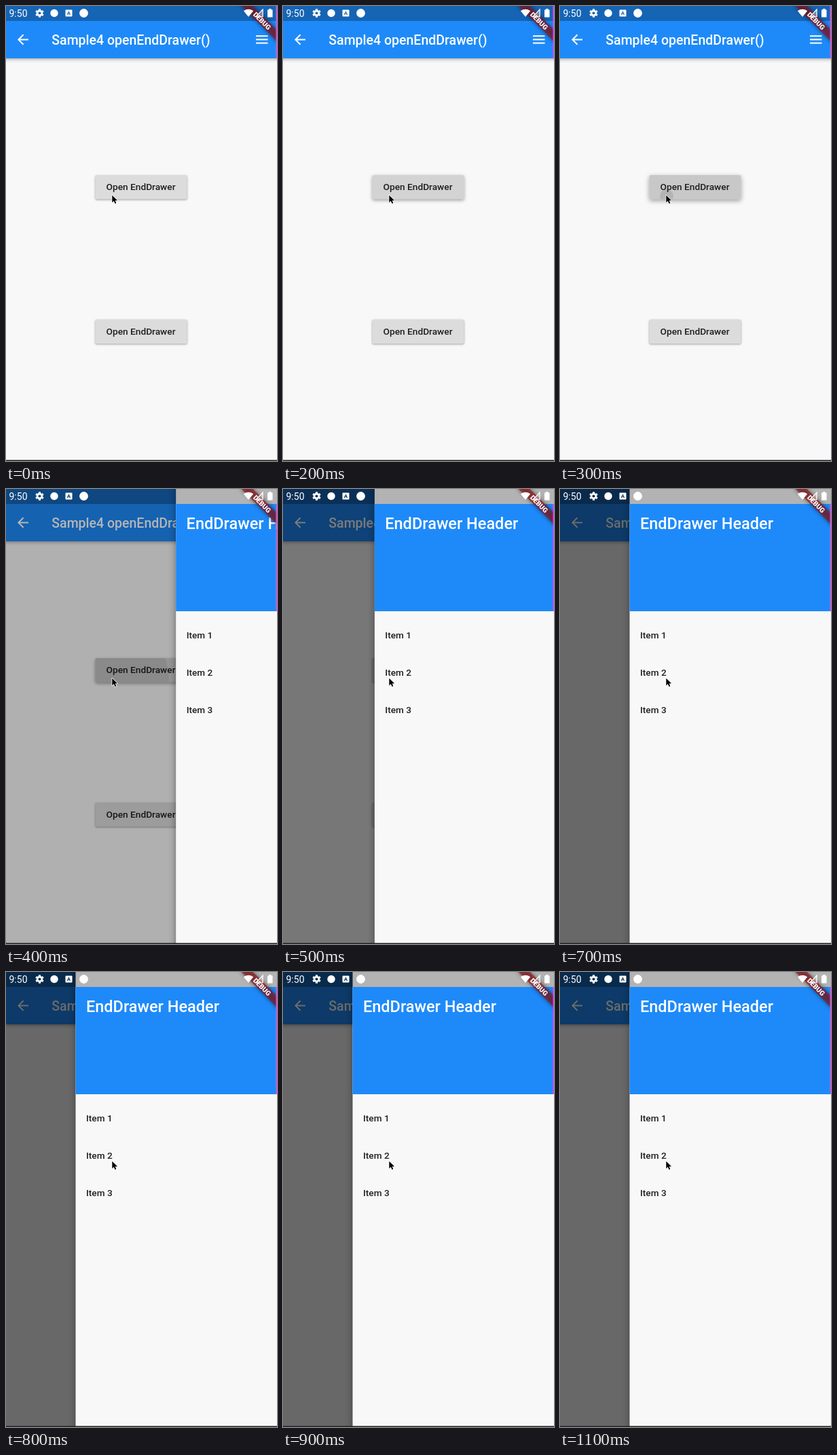
Write an HTML page with a canvas that moves like this. It is 399x670 px and loops after 1200 ms.

```html
<!DOCTYPE html>
<html lang="en">
<head>
<meta charset="utf-8">
<title>End drawer</title>
<style>
html, body { margin: 0; width: 100%; height: 100%; overflow: hidden; background: #f8f8f8; }
canvas { display: block; width: 399px; height: 670px; }
</style>
</head>
<body>
<canvas id="stage" width="399" height="670"></canvas>
<script>
const ctx = document.getElementById('stage').getContext('2d');
const W = 399, H = 670, LOOP = 1200, STEP = 100;
const BLUE = '#1e8af9', PAPER = '#f8f8f8', INK = '#1f1f1f';
const DRAWER = 296.5, BAR = 22;
const TOUCH = { x: 157, y: 280 };

const clamp = v => Math.max(0, Math.min(1, v));

function rect(x, y, w, h, color) {
  ctx.fillStyle = color;
  ctx.fillRect(x, y, w, h);
}

function circle(x, y, r, color) {
  ctx.fillStyle = color;
  ctx.beginPath();
  ctx.arc(x, y, r, 0, Math.PI * 2);
  ctx.fill();
}

function shape(points, color) {
  ctx.fillStyle = color;
  ctx.beginPath();
  points.forEach(([x, y]) => ctx.lineTo(x, y));
  ctx.closePath();
  ctx.fill();
}

function label(str, x, y, size, color, weight = 500, align = 'left') {
  ctx.font = `${weight} ${size}px Roboto, sans-serif`;
  ctx.textAlign = align;
  ctx.fillStyle = color;
  ctx.fillText(str, x, y);
}

function withShadow(alpha, blur, dy, draw) {
  ctx.save();
  ctx.shadowColor = `rgba(0,0,0,${alpha})`;
  ctx.shadowBlur = blur;
  ctx.shadowOffsetY = dy;
  draw();
  ctx.restore();
}

// Critically damped spring
function drawerOpen(t) {
  const u = Math.max(0, t - 319.6) * 0.02095;
  const p = 1 - (1 + u) * Math.exp(-u);
  return p > 0.99 ? 1 : p;
}

function button(y, press = 0, ripple = 0, splash = 0) {
  const x = 131.5, w = 135, h = 35.5;
  ctx.save();
  ctx.beginPath();
  ctx.roundRect(x, y, w, h, 2);
  ctx.fillStyle = '#dcdcdc';
  withShadow(0.36, 3 + 4 * press, 1 + 1.5 * press, () => ctx.fill());
  ctx.clip();
  rect(x, y, w, h, `rgba(0,0,0,${0.09 * press})`);
  if (ripple) circle(TOUCH.x, TOUCH.y, ripple, `rgba(0,0,0,${splash})`);
  ctx.restore();
  label('Open EndDrawer', 198.5, y + 22.3, 13.7, INK, 500, 'center');
}

function page(t) {
  rect(0, 0, W, H, PAPER);
  withShadow(0.35, 5, 1.5, () => rect(-8, 0, W + 16, 77, BLUE));

  ctx.strokeStyle = '#fff';
  ctx.lineWidth = 2;
  ctx.beginPath();
  ctx.moveTo(33, 49.5);
  ctx.lineTo(18.5, 49.5);
  ctx.moveTo(25.6, 42.3);
  ctx.lineTo(18.4, 49.5);
  ctx.lineTo(25.6, 56.7);
  ctx.stroke();
  for (let i = 0; i < 3; i++) rect(368, 43.2 + i * 5.2, 17.5, 2, '#fff');
  label('Sample4 openEndDrawer()', 67.3, 57, 19.5, '#fff');

  const press = t < 350 ? clamp((t - 100) / 200) : clamp(1 - (t - 350) / 120);
  const ripple = t < 250 ? 0 : t < 350 ? 10 : 83 + (t - 400) * 0.5;
  const splash = t < 350 ? 0.1 : 0.07 * clamp(1 - (t - 400) / 200);
  button(249, press, ripple, splash);
  button(461.8);
}

function drawer(p) {
  if (p <= 0) return;
  rect(0, 0, W, H, `rgba(0,0,0,${0.58 * p})`);
  const x = W - DRAWER * p;
  withShadow(0.4, 10, 0, () => rect(x, -20, DRAWER, H + 40, PAPER));
  rect(x, BAR, DRAWER, 158, BLUE);
  label('EndDrawer Header', x + 15.4, 59.4, 23.5, '#fff');
  for (let i = 0; i < 3; i++) {
    label('Item ' + (i + 1), x + 15.5, 220.4 + i * 55, 13.6, INK);
  }
}

function banner() {
  ctx.save();
  ctx.translate(W, 0);
  ctx.rotate(Math.PI / 4);
  ctx.filter = 'blur(3px)';
  rect(-39, 25, 78, 12, 'rgba(0,0,0,0.5)');
  ctx.filter = 'none';
  rect(-39, 25, 78, 12, 'rgba(150,20,28,0.63)');
  label('DEBUG', 0, 34.6, 10, '#fff', 900, 'center');
  ctx.restore();
}

function gear(x, y) {
  ctx.save();
  ctx.translate(x, y);
  for (let i = 0; i < 6; i++) {
    rect(-1.6, -6.2, 3.2, 4, '#fff');
    ctx.rotate(Math.PI / 3);
  }
  ctx.strokeStyle = '#fff';
  ctx.lineWidth = 2.6;
  ctx.beginPath();
  ctx.arc(0, 0, 3.4, 0, Math.PI * 2);
  ctx.stroke();
  ctx.restore();
}

function statusBar(back) {
  label('9:50', 4.5, 15.6, 14, '#fff', 400);
  gear(49.5, 10.5);
  circle(71, 10.5, 5.7, '#fff');
  ctx.beginPath();
  ctx.roundRect(87.5, 5.5, 10, 10, 1);
  ctx.fillStyle = '#fff';
  ctx.fill();
  label('A', 92.5, 13.4, 8, back, 700, 'center');
  circle(114.5, 10.5, 6.4, '#fff');

  // Wi-Fi
  ctx.fillStyle = '#fff';
  ctx.beginPath();
  ctx.moveTo(357, 16);
  ctx.lineTo(349.8, 7.2);
  ctx.quadraticCurveTo(357, 2.4, 364.2, 7.2);
  ctx.closePath();
  ctx.fill();

  // Signal
  shape([[368, 16], [378.5, 16], [378.5, 5]], 'rgba(255,255,255,0.35)');
  ctx.strokeStyle = '#fff';
  ctx.lineWidth = 1.2;
  ctx.beginPath();
  ctx.moveTo(368, 16);
  ctx.lineTo(378, 16);
  ctx.lineTo(378, 5);
  ctx.closePath();
  ctx.stroke();

  // Battery
  rect(385, 5.5, 7.5, 11, '#fff');
  rect(387, 4, 3.5, 2, '#fff');
}

function cursor() {
  ctx.save();
  ctx.translate(156.3, 278.8);
  ctx.beginPath();
  [[0, 0], [0, 10.6], [2.5, 8.3], [4.2, 12.2], [6, 11.4], [4.4, 7.6], [7.8, 7.5]]
    .forEach(([x, y]) => ctx.lineTo(x, y));
  ctx.closePath();
  ctx.lineJoin = 'round';
  ctx.lineWidth = 1.6;
  ctx.strokeStyle = '#fff';
  ctx.stroke();
  ctx.fillStyle = '#000';
  ctx.fill();
  ctx.restore();
}

function draw(t) {
  const open = drawerOpen(t);
  page(t);
  drawer(open);
  rect(0, 0, W, BAR, 'rgba(0,0,0,0.28)');
  banner();
  rect(W - 1.5, open ? BAR : 0, 1.5, open ? 158 : 77, '#e64cf0');
  statusBar(open > 0.5 ? '#0c2f55' : '#1763b3');
  rect(0, H - 1.5, W, 1.5, '#222');
  cursor();
}

const start = performance.now();
function tick() {
  const t = (performance.now() - start) % LOOP;
  draw(Math.floor(t / STEP) * STEP);
  requestAnimationFrame(tick);
}
tick();
</script>
</body>
</html>
```
